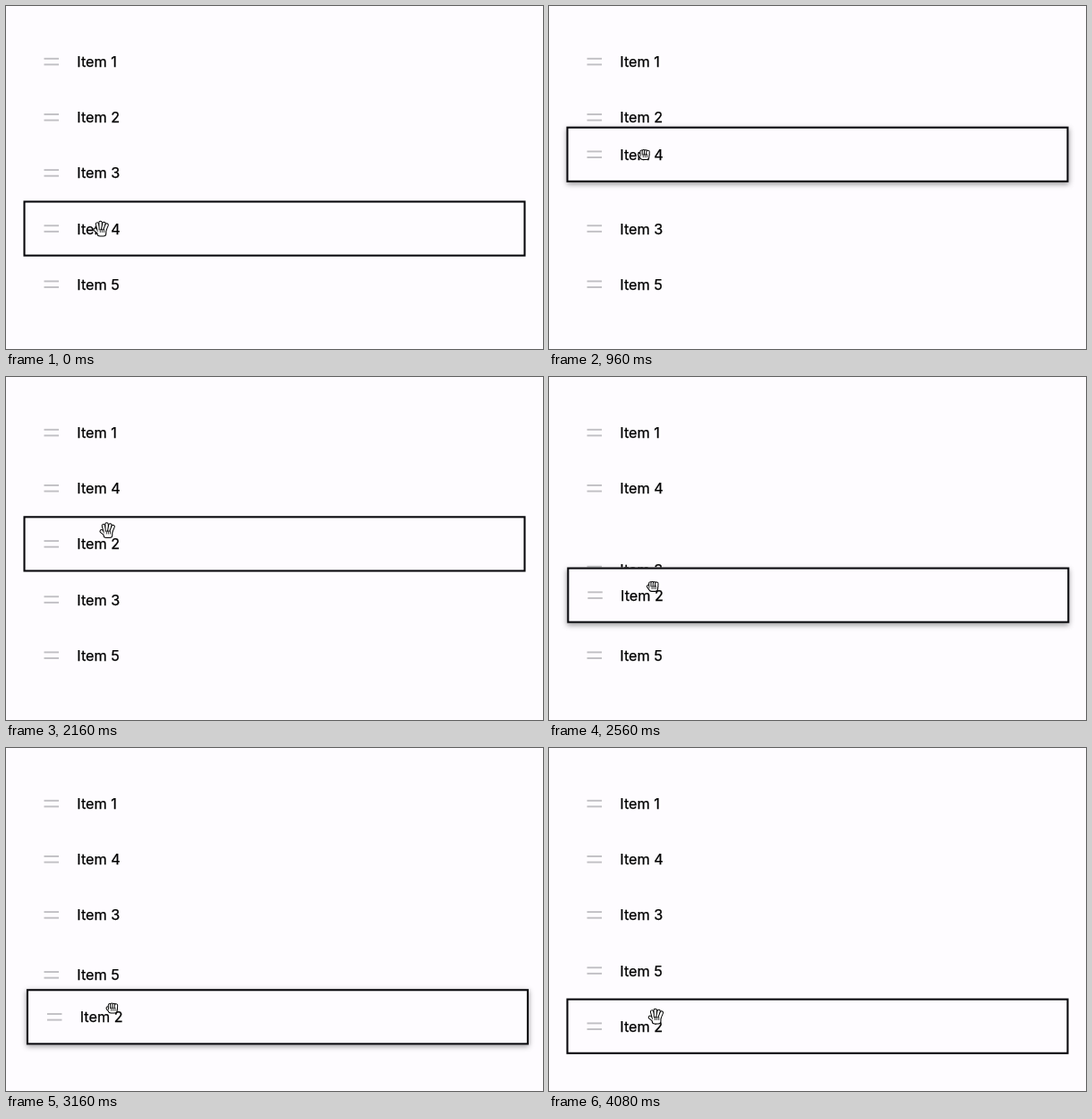
Animation of 600x383 px, one loop 5800 ms. Source, as an HTML page with a canvas:

```html
<!DOCTYPE html>
<html lang="en">
<head>
<meta charset="utf-8">
<title>Reorder list</title>
<style>
  html, body { margin: 0; width: 100%; height: 100%; overflow: hidden; background: #fefcff; }
  canvas { display: block; }
</style>
</head>
<body>
<canvas id="stage" width="600" height="383"></canvas>
<script>
const ctx = document.getElementById('stage').getContext('2d');
const LOOP = 5800, STEP = 40, PITCH = 62.15;
const BG = '#fefcff', INK = '#08080c';

const clamp = v => Math.min(1, Math.max(0, v));
const mix = (a, b, p) => a + (b - a) * p;
const slotY = slot => 62.1 + slot * PITCH;

// Pointer stops: time, x, y, ease-out power on the way there
const stops = [
  [240, 106, 249.5], [960, 106, 166.7], [1360, 104.8, 121.5], [1600, 104.8, 121.5],
  [2160, 113, 172], [2260, 115, 177.3], [2800, 116.2, 263.3, 1.35], [3520, 119.2, 300.5, 2]
];

function pointerAt(t) {
  const i = Math.max(1, stops.findIndex(s => s[0] >= t));
  const last = t > stops.at(-1)[0];
  const [t0, x0, y0] = stops[i - 1], [t1, x1, y1, power = 1] = last ? stops.at(-1) : stops[i];
  const p = 1 - (1 - clamp((t - t0) / (t1 - t0))) ** power;
  return { x: mix(x0, x1, p), y: mix(y0, y1, p) };
}

const drags = [
  { item: 4, grab: 240, drop: 1640, rest: 2000 },
  { item: 2, grab: 2260, drop: 3760, rest: 4080 }
];

// A neighbour gives way once the dragged edge passes its centre
const shifts = [];
const order = [1, 2, 3, 4, 5];
for (const d of drags) {
  d.start = pointerAt(d.grab);
  d.from = d.to = order.indexOf(d.item);
  for (let t = d.grab; t < d.drop; t++) {
    const y = slotY(d.from) + pointerAt(t).y - d.start.y;
    const dir = Math.sign(y - slotY(d.to)), next = d.to + dir;
    if (!dir || !(next in order) || (y + dir * PITCH / 2 - slotY(next)) * dir <= 0) continue;
    shifts.push({ item: order[next], at: t, from: next, to: d.to });
    [order[next], order[d.to]] = [order[d.to], order[next]];
    d.to = next;
  }
}

// cubic-bezier(.4, 0, .1, 1)
function ease(x) {
  let lo = 0, hi = 1;
  for (let i = 0; i < 20; i++) {
    const s = (lo + hi) / 2, r = 1 - s;
    if (1.2 * r * r * s + 0.3 * r * s * s + s * s * s < x) lo = s; else hi = s;
  }
  return lo * lo * (3 - 2 * lo);
}

function itemAt(item, t) {
  let x = 0, y = slotY(item - 1);
  for (const s of shifts) {
    if (s.item === item && t >= s.at) y = mix(slotY(s.from), slotY(s.to), ease(clamp((t - s.at) / 450)));
  }
  for (const d of drags) {
    if (d.item !== item || t < d.grab) continue;
    const now = pointerAt(Math.min(t, d.drop));
    const left = (1 - clamp((t - d.drop) / 160)) ** 3;
    x = (now.x - d.start.x) * left;
    y = mix(slotY(d.to), slotY(d.from) + now.y - d.start.y, left);
  }
  return { x, y };
}

function line(x0, y0, x1, y1, width, color) {
  ctx.beginPath();
  ctx.moveTo(x0, y0);
  ctx.lineTo(x1, y1);
  ctx.lineWidth = width;
  ctx.strokeStyle = color;
  ctx.stroke();
}

function drawItem(item, t, framed, raised) {
  const { x, y } = itemAt(item, t);
  ctx.save();
  ctx.translate(x, y);
  if (framed) {
    ctx.save();
    if (raised) {
      ctx.shadowColor = 'rgba(0,0,0,.42)';
      ctx.shadowBlur = 6;
      ctx.shadowOffsetY = 2;
    }
    ctx.fillStyle = BG;
    ctx.fillRect(19.5, -PITCH / 2, 561, PITCH);
    ctx.restore();
    ctx.strokeStyle = INK;
    ctx.lineWidth = 2.1;
    ctx.strokeRect(20.5, 1 - PITCH / 2, 559, PITCH - 2);
  }
  for (const dy of [-3.3, 3.3]) line(42.5, dy, 59, dy, 1.9, '#c0bfc3');
  ctx.fillStyle = ctx.strokeStyle = '#000';
  ctx.lineWidth = 0.25;
  ctx.font = '16.2px Inter, sans-serif';
  ctx.fillText('Item ' + item, 79.3, 6);
  ctx.strokeText('Item ' + item, 79.3, 6);
  ctx.restore();
}

function drawHand({ x, y }, held) {
  const base = held ? 0.5 : 1.5, depth = held ? 4.6 : 6.3;
  const reach = held ? 4.2 : 8.5, taper = held ? 0.4 : 1.3, fan = held ? 0.04 : 0.22;
  const fingers = [[-2.6, base + 2.5, held ? -5 : -6.6, base - 0.4]];
  for (let i = 0; i < 4; i++) {
    const bx = 2.2 * i - 2.6, off = i - 1.2;
    const length = reach - taper * Math.abs(off);
    fingers.push([bx, base, bx + length * Math.sin(fan * off), base - length * Math.cos(fan * off)]);
  }
  ctx.save();
  ctx.translate(x + 0.3, y - 0.8);
  ctx.lineCap = 'round';
  const palm = new Path2D();
  palm.roundRect(-3.7, base, 8.6, depth, [0, 0, 2.5, 2.5]);
  ctx.strokeStyle = '#000';
  ctx.lineWidth = 2.2;
  ctx.stroke(palm);
  for (const f of fingers) {
    line(...f, 4.4, '#000');
    line(...f, 2.4, '#fff');
  }
  ctx.fillStyle = '#fff';
  ctx.fill(palm);
  for (let cx = -1; cx < 4; cx += 2.1) line(cx, base - 0.8, cx, base + 2.4, 0.8, '#000');
  ctx.restore();
}

function draw(t) {
  ctx.fillStyle = BG;
  ctx.fillRect(0, 0, 600, 383);
  const active = drags[t < drags[0].rest ? 0 : 1];
  for (const item of order) if (item !== active.item) drawItem(item, t);
  drawItem(active.item, t, true, t >= active.grab && t < active.rest);
  drawHand(pointerAt(t), t >= active.grab && t < active.drop);
}

function tick() {
  draw(Math.floor(performance.now() % LOOP / STEP) * STEP);
  requestAnimationFrame(tick);
}
tick();
</script>
</body>
</html>
```
